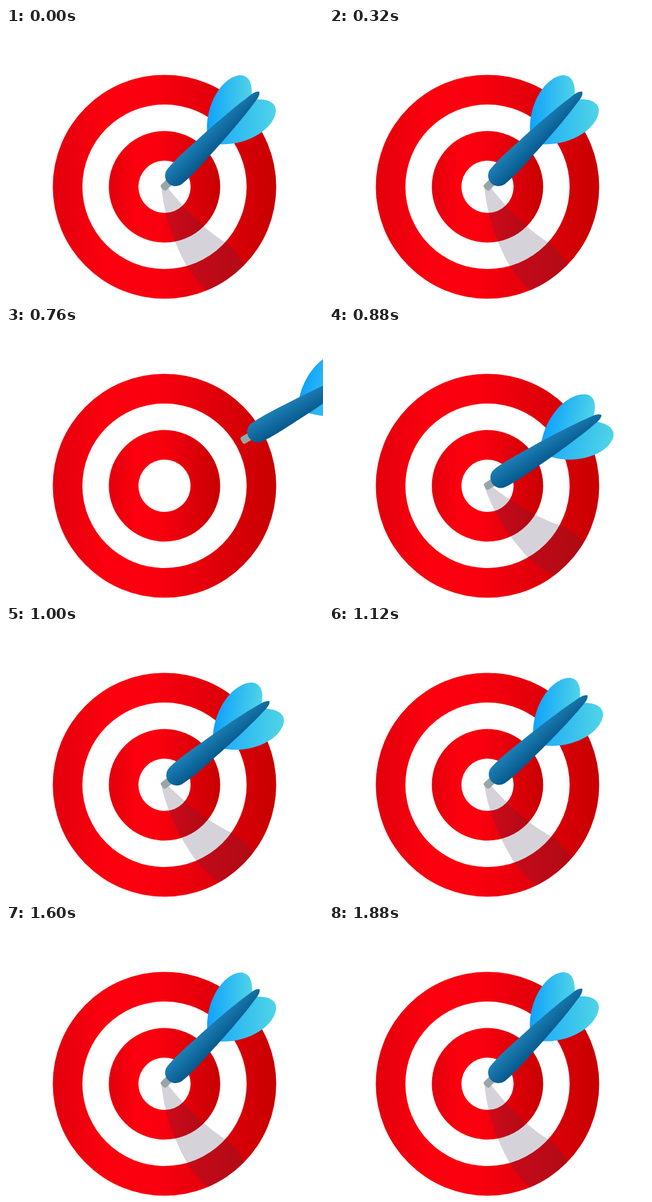
Recreate the animation shown at these times as an HTML page. Size 498 px wide and 425 px high, loop 1920 ms.

```html
<!DOCTYPE html>
<html lang="en">
<head>
<meta charset="utf-8">
<title>Dart and target</title>
<style>
  html, body { margin: 0; width: 100%; height: 100%; overflow: hidden; background: #fff; }
  svg { display: block; width: 498px; height: 425px; }
</style>
</head>
<body>
<svg viewBox="0 0 498 425">
  <defs>
    <linearGradient id="red">
      <stop offset="0" stop-color="#e2000c"/>
      <stop offset=".24" stop-color="#fc000e"/>
      <stop offset=".45" stop-color="#fa000e"/>
      <stop offset=".72" stop-color="#e0000a"/>
      <stop offset="1" stop-color="#c80000"/>
    </linearGradient>
    <linearGradient id="wing">
      <stop offset="0" stop-color="#0fa2fc"/>
      <stop offset="1" stop-color="#50d4e6"/>
    </linearGradient>
    <linearGradient id="lowWing">
      <stop offset="0" stop-color="#20aef7"/>
      <stop offset="1" stop-color="#50d4e6"/>
    </linearGradient>
    <linearGradient id="steel" gradientUnits="userSpaceOnUse" x1="252" y1="221" x2="278" y2="247">
      <stop offset="0" stop-color="#1d80b6"/>
      <stop offset="1" stop-color="#05568a"/>
    </linearGradient>
    <clipPath id="disc"><circle cx="249" cy="249" r="175.5"/></clipPath>
  </defs>

  <circle cx="249" cy="249" r="175.5" fill="url(#red)"/>
  <circle cx="249" cy="249" r="129" fill="#fff"/>
  <circle cx="249" cy="249" r="87.5" fill="url(#red)"/>
  <circle cx="249" cy="249" r="41" fill="#fff"/>

  <g clip-path="url(#disc)">
    <path id="shadow" fill="#3c324b" fill-opacity=".21"
      d="M244 250C248 290 262 335 285 375C296 392 308 404 322 416L384 392C376 370 360 347 346 337C320 322 285 290 254 250Z"/>
  </g>

  <g id="dart">
    <rect x="244.5" y="243" width="24" height="12" rx="3.5" fill="#98a6a9" transform="rotate(-45 249 249)"/>
    <path fill="url(#wing)" d="M316 166C312 120 340 76 368 74C382 74 387 88 386 105L350 150Z"/>
    <path fill="url(#lowWing)" d="M332 182C378 186 422 158 424 130C424 116 410 111 393 112L350 150Z"/>
    <path fill="url(#steel)"
      d="M398 100C391 99 386 104 378 110C356 126 316 161 300 176C282 192 264 208 253 222A16.5 16.5 0 0 0 276 245C290 234 306 216 322 198C337 182 372 142 388 120C394 112 399 107 398 100Z"/>
  </g>
</svg>
<script>
  const LOOP = 1920, STEP = 40;
  const FADE_START = 440, FADE_END = 600;
  const HIT = 835, SWING_START = 860;
  const SPEED = 1.925, TILT = 15;
  const rad = Math.PI / 180;
  const dart = document.getElementById('dart');
  const shadow = document.getElementById('shadow');

  // Clockwise tilt from the resting pose, in degrees
  function tiltAt(t) {
    if (t < FADE_END) return 0;
    if (t < SWING_START) return TILT;
    const s = t - 1000;
    return 7.62 * 2 ** (-s / 120) * Math.cos((30 + s * 3) * rad);
  }

  function draw(t) {
    const leaving = t < FADE_END;
    const alpha = leaving ? Math.min(1, (FADE_END - t) / (FADE_END - FADE_START)) : 1;
    const dist = leaving ? 0 : Math.max(0, (HIT - t) * SPEED);
    const tilt = tiltAt(t);
    const dir = (45 - TILT) * rad;
    const x = dist * Math.cos(dir), y = -dist * Math.sin(dir);

    dart.setAttribute('transform', `translate(${x} ${y}) rotate(${tilt} 249 249)`);
    dart.setAttribute('opacity', alpha);

    // The shadow mirrors the swing and reaches further downwards
    const turn = -tilt * (tilt > 0 ? 1.05 : 1.8);
    shadow.setAttribute('transform', `rotate(${turn} 249 249)`);
    shadow.setAttribute('opacity', dist > 0 ? 0 : alpha);
  }

  const start = performance.now();
  function tick() {
    const t = (performance.now() - start) % LOOP;
    draw(Math.floor(t / STEP) * STEP);
    requestAnimationFrame(tick);
  }
  tick();
</script>
</body>
</html>
```
